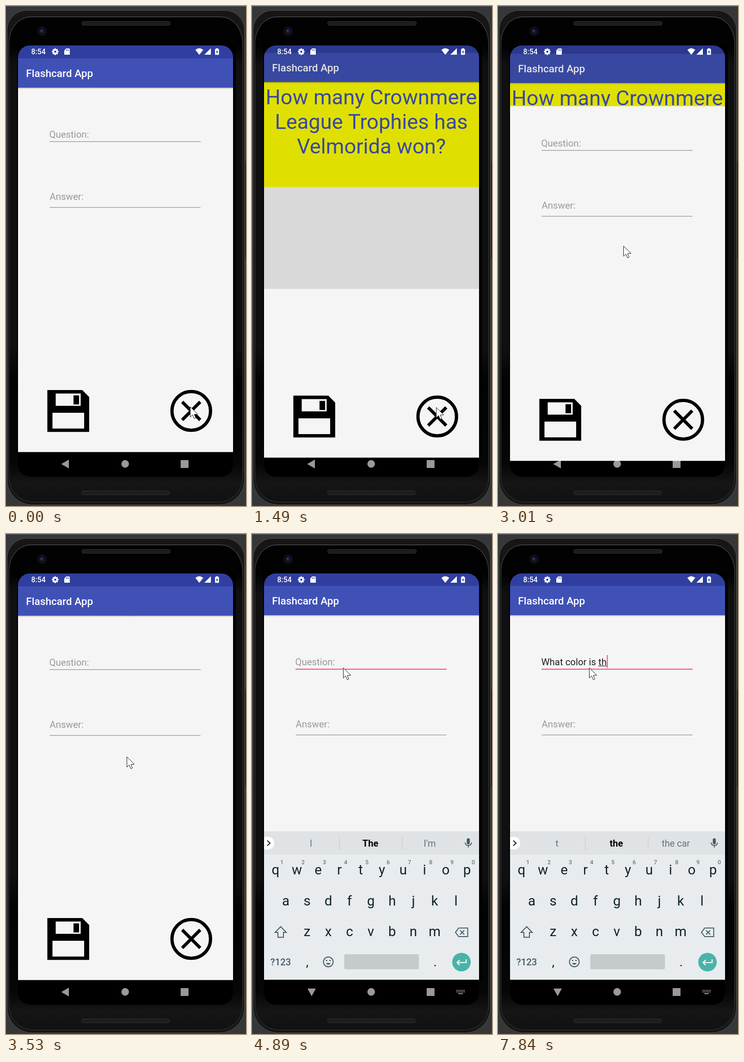
Write an HTML page with a canvas that moves like this. It is 519 by 1078 pixels and loops after 8000 ms.

```html
<!DOCTYPE html>
<html lang="en">
<head>
<meta charset="utf-8">
<title>Flashcard App</title>
<style>
html, body { margin: 0; width: 100%; height: 100%; overflow: hidden; background: #363738; }
canvas { display: block; width: 519px; height: 1078px; }
</style>
</head>
<body>
<canvas id="stage" width="519" height="1078"></canvas>
<script>
const ctx = document.getElementById('stage').getContext('2d');
const LOOP = 8000;
const PAPER = '#f5f5f5', BLUE = '#3f51b5', DARK_BLUE = '#303f9f', PINK = '#ff4081';
const BAR_TOP = 112, BAR_BOTTOM = 175.2, PAGE_BOTTOM = 960.7;

// Each row is [start time, ...values]; values hold until the next row.
const CURSOR = [
  [0, 398, 863.5], [670, 398, 865], [2750, 378, 805], [2880, 324, 660], [3010, 271, 517],
  [3210, 264, 492], [3360, 261, 480], [3810, 254, 452], [3940, 240, 408], [4070, 222, 352],
  [4210, 204, 306], [4340, 196, 289], [4470, 195, 287], [4590, 196, 288], [4740, 197, 288]
];
// editor offset, editor clip top, list offset, list dimming
const PAGES = [
  [0, 1, 0, 0, 0], [120, 0, 0, 0, 0],
  [1360, 2, 230, -18, .115], [1490, 13, 610, -11, .115], [1660, 28, 915, -3, .05], [1840, 0, 1078, 0, 0],
  [2620, 38, 940, 0, .02], [2750, 36, 760, -1, .08], [2880, 30, 470, -4, .115], [3010, 20, 216, -9, .115],
  [3210, 9, 0, -14, .115], [3360, 4, 0, -17, .115], [3510, 1, 0, -18, .115], [3660, 0, 0, 0, 0]
];
// text, start of the word being composed, suggestions
const TYPING = [
  [0, '', 0, 'I', 'The', "I'm"],
  [5320, 'W', 0, 'I', 'The', "I'm"],
  [5460, 'Wh', 0, 'I', 'The', "I'm"],
  [5590, 'Wha', 0, 'I', 'The', "I'm"],
  [5900, 'What', 0, 'Wha', 'What', 'Whatever'],
  [6020, 'What ', 5, 'is', 'are', 'do'],
  [6330, 'What co', 5, 'c', 'can', 'color'],
  [6470, 'What col', 5, 'co', 'color', 'come'],
  [6610, 'What colo', 5, 'col', 'color', 'colors'],
  [6750, 'What color', 5, 'colo', 'color', 'colors'],
  [7030, 'What color ', 11, 'color', 'colors', 'coloring'],
  [7160, 'What color i', 11, 'is', 'of', 'do'],
  [7300, 'What color is', 11, 'i', 'is', 'in'],
  [7430, 'What color is ', 14, 'is', 'is the', 'it'],
  [7570, 'What color is t', 14, 'I', 'the', 'it'],
  [7840, 'What color is th', 14, 't', 'the', 'the car']
];
const held = (rows, t) => rows.findLast(row => row[0] <= t).slice(1);

function rect(x, y, w, h, color) {
  ctx.fillStyle = color;
  ctx.fillRect(x, y, w, h);
}
function rounded(x, y, w, h, r, fill, stroke) {
  ctx.beginPath();
  ctx.roundRect(x, y, w, h, r);
  if (fill) { ctx.fillStyle = fill; ctx.fill(); }
  if (stroke) { ctx.strokeStyle = stroke; ctx.lineWidth = 1; ctx.stroke(); }
}
function circle(x, y, r, fill, stroke, width = 2) {
  ctx.beginPath();
  ctx.arc(x, y, r, 0, 7);
  if (fill) { ctx.fillStyle = fill; ctx.fill(); }
  if (stroke) { ctx.strokeStyle = stroke; ctx.lineWidth = width; ctx.stroke(); }
}
function shape(d, fill, stroke, width = 2) {
  const path = new Path2D(d);
  if (fill) { ctx.fillStyle = fill; ctx.fill(path); }
  if (stroke) { ctx.strokeStyle = stroke; ctx.lineWidth = width; ctx.stroke(path); }
}
function text(str, x, y, size, color, { weight = 400, align = 'left' } = {}) {
  ctx.font = `${weight} ${size}px Roboto, sans-serif`;
  ctx.textAlign = align;
  ctx.fillStyle = color;
  ctx.fillText(str, x, y);
}
function gradient(y0, y1, ...stops) {
  const g = ctx.createLinearGradient(0, y0, 0, y1);
  stops.forEach(([at, color]) => g.addColorStop(at, color));
  return g;
}
function scoped(draw) {
  ctx.save();
  draw();
  ctx.restore();
}
function clipTo(x, y, w, h, r = 0) {
  ctx.beginPath();
  ctx.roundRect(x, y, w, h, r);
  ctx.clip();
}

function drawPhone() {
  rect(0, 0, 519, 1078, '#363738');
  rect(0, 0, 519, 1, '#626465');
  rounded(2.5, 9.5, 513, 1066, [42, 42, 54, 54], '#161616', '#505050');
  rounded(6.5, 23.5, 505, 1046, [{ x: 46, y: 56 }, { x: 46, y: 56 }, 52, 52],
    gradient(23, 1070, [0, '#020202'], [.06, '#020202'], [.1, '#101010'], [.68, '#101010'],
      [.75, '#030303'], [.92, '#060606'], [.96, '#151515'], [1, '#111']),
    gradient(23, 1070, [0, '#6a6a6a'], [.08, '#3a3a3a'], [1, '#3a3a3a']));
  rect(24, 84, 473, 880, '#000');
  rect(517, 335, 2, 210, '#222');
  for (const [y, w] of [[33, 192], [1045, 190]]) {
    rounded(163.5, y + .5, w, 8, 4, '#1a1918', '#3c3833');
    for (let x = 168; x < 160 + w; x += 3) rect(x, y + 3, 1, 3, '#2e2b28');
  }
  circle(78, 54.5, 9.5, '#0b0c10', '#202020', 1);
  circle(78, 54.5, 5.5, '#12183a');
  circle(77, 53.5, 2.5, '#25367c');
}

function drawStatusIcons() {
  text('8:54', 54.5, 104.3, 15.8, '#fff', { weight: 500 });
  circle(106.5, 98.5, 4, null, '#fff', 3.4);
  for (let i = 0; i < 8; i++) {
    scoped(() => {
      ctx.translate(106.5, 98.5);
      ctx.rotate(i * Math.PI / 4);
      rect(-1.5, -7.2, 3, 3, '#fff');
    });
  }
  shape('M130 91.5H136.5Q138 91.5 138 93V104Q138 105 137 105H127Q126 105 126 104V96Z', '#fff');
  for (const x of [130, 132.5, 135]) rect(x, 93.5, 1.2, 3, DARK_BLUE);
  shape('M409.5 94.5Q418 87.5 426.5 94.5L418 105.2Z', '#fff');
  shape('M443 91V105H429Z', '#fff');
  rounded(452, 92.5, 8.5, 12.8, 1, '#fff');
  rect(454.5, 91, 3.5, 2, '#fff');
  shape('M457 94.5L453.8 99.8H455.8V103.5L458.8 98.2H456.8Z', DARK_BLUE);
}

function drawNavigation(keyboardOpen) {
  const grey = '#9a9a9a';
  shape(keyboardOpen ? 'M120 980H138L129 996.5Z' : 'M119.5 987.5L136 978V997Z', grey);
  circle(257.7, 987.3, 8.2, grey);
  rounded(377.7, 979, 17, 17, 1, grey);
  if (!keyboardOpen) return;
  for (let i = 0; i < 6; i++) {
    rect(442 + i * 3.2, 983, 2, 2, grey);
    rect(442 + i * 3.2, 986.3, 2, 2, grey);
  }
  rect(446, 990, 10, 2, grey);
}

function drawPageBase() {
  rect(26, 85, 465, 28, DARK_BLUE);
  rect(26, BAR_TOP, 465, BAR_BOTTOM - BAR_TOP, BLUE);
  rect(26, BAR_BOTTOM, 465, PAGE_BOTTOM - BAR_BOTTOM, PAPER);
  text('Flashcard App', 43.3, 152.3, 22.6, '#fff', { weight: 500 });
}
const drawBarShadow = () => rect(26, BAR_BOTTOM, 465, 3,
  gradient(BAR_BOTTOM, BAR_BOTTOM + 3, [0, 'rgba(0,0,0,.25)'], [1, 'rgba(0,0,0,0)']));

function drawListPage(dim) {
  drawPageBase();
  rect(26, BAR_BOTTOM, 465, 226, '#fdfd00');
  const lines = ['How many Crownmere', 'League Trophies has', 'Velmorida won?'];
  lines.forEach((line, i) => text(line, 258, 223.3 + i * 53, 45.24, BLUE, { align: 'center' }));
  drawBarShadow();
  circle(400.6, 870, 45.2, '#000');
  rect(396.8, 847, 8, 46, PAPER);
  rect(378, 866, 45.5, 8, PAPER);
  rect(26, 85, 465, 900, `rgba(0,0,0,${dim})`);
}

function drawEditorPage(typed, composeFrom, focused, caretOn) {
  const size = 20.4, left = 93.5, hint = '#999';
  drawPageBase();
  drawBarShadow();
  if (typed) text(typed, left, 282.6, size, '#212121');
  else text('Question:', left, 282.6, size, hint);
  text('Answer:', 94.5, 416.6, size, hint);
  rect(94, focused ? 290.5 : 290.8, 327, focused ? 2 : 1.2, focused ? PINK : '#8c8c8c');
  rect(94.5, 432.7, 326, 1.2, '#8c8c8c');
  if (focused) {
    ctx.font = `400 ${size}px Roboto, sans-serif`;
    const end = left + ctx.measureText(typed).width;
    const start = left + ctx.measureText(typed.slice(0, composeFrom)).width;
    if (typed.length > composeFrom) rect(start, 284, end - start, 1.2, '#212121');
    if (caretOn) rect(end + .5, 261, 2, 28, PINK);
  }

  shape('M89.4 826.9H165L179.9 842V917.3H89.4Z', '#000');
  rect(107.5, 834.5, 54, 26.5, PAPER);
  rect(146, 838.5, 12, 19.5, '#000');
  rect(100.5, 876, 68.5, 34, PAPER);
  circle(400.6, 872, 41.7, null, '#000', 7);
  shape('M381 852.5L420 891.5M420 852.5L381 891.5', null, '#000', 6.8);
}

function drawKeyboard(suggestions) {
  const ink = '#10222b', icon = '#455a64', center = { align: 'center' };
  rect(26, 641, 465, 320, '#e8ecee');
  rect(26, 641, 465, 50, '#dfe3e6');
  rounded(26, 653, 22, 27, [0, 13, 13, 0], '#fff');
  shape('M33 661L39 666.5L33 672', null, '#222', 2.3);
  rect(188.3, 653, 1, 28, '#c3c8cb');
  rect(324.3, 653, 1, 28, '#c3c8cb');
  suggestions.forEach((word, i) => text(word, [127.5, 256, 384.5][i], 674, 20,
    i === 1 ? '#000' : '#667277', { align: 'center', weight: i === 1 ? 700 : 400 }));
  rounded(464.5, 656, 6.5, 13, 3.2, icon);
  shape('M461 665Q461 671.5 467.7 671.5Q474.5 671.5 474.5 665M467.7 671.5V676', null, icon, 1.8);

  const rows = [['qwertyuiop', 51, 733.5], ['asdfghjkl', 73, 800.5], ['zxcvbnm', 119, 867]];
  for (const [keys, x, y] of rows) {
    [...keys].forEach((key, i) => text(key, x + i * 46, y, 29.5, ink, center));
  }
  [...'1234567890'].forEach((digit, i) =>
    text(digit, 64.5 + i * 46, 711.5, 12.5, '#6c777c', { align: 'center', weight: 500 }));

  shape('M62 846.5L74 859H68V869.5H56V859H50Z', null, icon);
  shape('M447 849.5H466.5V868H447L440 858.8Z', null, icon);
  shape('M450 854.5L459 863.5M459 854.5L450 863.5', null, icon);
  text('?123', 62, 930, 20.3, icon, { align: 'center', weight: 500 });
  text(',', 119.5, 932, 27, ink, center);
  text('.', 396, 932, 27, ink, center);
  circle(165, 922.5, 10.5, null, icon);
  circle(161.3, 919.5, 1.6, icon);
  circle(168.7, 919.5, 1.6, icon);
  shape('M159.5 925Q165 932 170.5 925Z', icon);
  rounded(199.5, 906, 161.5, 32.5, 3, '#c5cacd');
  circle(453, 923, 20, '#4ab3a9');
  shape('M463 917V924H444M449 918.5L443.5 924L449 929.5', null, '#fff', 2.2);
}

function drawCursor(x, y) {
  scoped(() => {
    ctx.translate(x + .5, y + .5);
    shape('M0 0V22L5 17.5L8.5 25.5L12 24L8.5 16.5L16 16Z', '#fff', '#111', 1);
  });
}

function drawScene(t) {
  const [editorY, clipTop, listY, dim] = held(PAGES, t);
  const [typed, composeFrom, ...suggestions] = held(TYPING, t);
  const focused = t >= 4470;
  const caretOn = t < 4890 || t >= 5320;
  const keyboardY = t < 4590 ? 320 : t < 4740 ? 130 : 0;

  drawPhone();
  scoped(() => {
    clipTo(26, 85, 465, 930, 26);
    rect(26, 85, 465, 930, '#000');
    drawNavigation(focused);
    scoped(() => {
      ctx.translate(0, listY);
      drawListPage(dim);
    });
    scoped(() => {
      clipTo(26, clipTop, 465, 1078);
      ctx.translate(0, editorY);
      drawEditorPage(typed, composeFrom, focused, caretOn);
    });
    if (keyboardY < 320) scoped(() => {
      clipTo(26, 85, 465, PAGE_BOTTOM - 85);
      ctx.translate(0, keyboardY);
      drawKeyboard(suggestions);
    });
    drawStatusIcons();
  });
  drawCursor(...held(CURSOR, t));
}

const startTime = performance.now();
function frame() {
  drawScene((performance.now() - startTime) % LOOP);
  requestAnimationFrame(frame);
}
frame();
</script>
</body>
</html>
```
